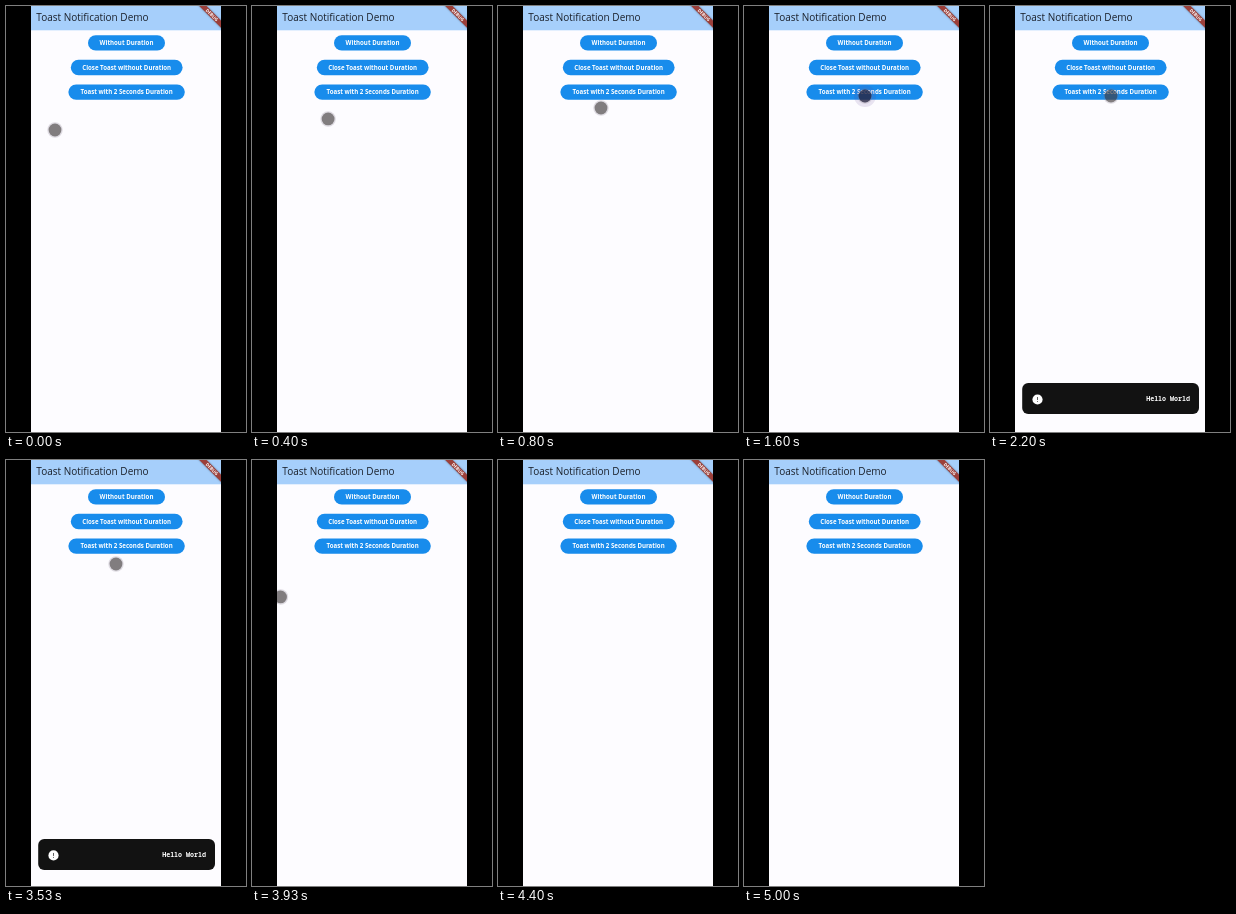
An HTML page with a canvas for the animation above (5.07 s loop, 240 by 426 pixels).

```html
<!DOCTYPE html>
<html lang="en">
<head>
<meta charset="utf-8">
<title>Toast Notification Demo</title>
<style>
  html, body { margin: 0; width: 100%; height: 100%; overflow: hidden; background: #000; }
  canvas { display: block; width: 240px; height: 426px; }
</style>
</head>
<body>
<canvas id="stage"></canvas>
<script>
const W = 240, H = 426, LOOP = 5070;
const PAGE = { x: 25, w: 190 };
const SANS = '"Open Sans", "Noto Sans", sans-serif';
const MONO = '"Noto Sans Mono", "DejaVu Sans Mono", monospace';
const BUTTONS = [
  { label: 'Without Duration', x: 82, y: 29.2, w: 77 },
  { label: 'Close Toast without Duration', x: 64.8, y: 53.8, w: 111.8 },
  { label: 'Toast with 2 Seconds Duration', x: 62.4, y: 78.4, w: 116.4 }
];
// pointer path: time, x, y
const PATH = [
  [0, 49, 124], [800, 103, 102], [1330, 121, 90],
  [3170, 121, 90], [3530, 110, 104], [4050, 16, 142]
];

const canvas = document.getElementById('stage');
const ratio = window.devicePixelRatio || 1;
canvas.width = W * ratio;
canvas.height = H * ratio;
const ctx = canvas.getContext('2d');

const clamp = v => Math.max(0, Math.min(1, v));
const span = (t, from, to) => clamp((t - from) / (to - from));
const smooth = p => p * p * (3 - 2 * p);

function pill(x, y, w, h, r, color) {
  ctx.fillStyle = color;
  ctx.beginPath();
  ctx.roundRect(x, y, w, h, r);
  ctx.fill();
}

function disc(x, y, r, color) {
  ctx.fillStyle = color;
  ctx.beginPath();
  ctx.arc(x, y, r, 0, Math.PI * 2);
  ctx.fill();
}

function text(str, x, y, font, color, align = 'left') {
  ctx.font = font;
  ctx.fillStyle = color;
  ctx.textAlign = align;
  ctx.fillText(str, x, y);
}

function drawPage() {
  ctx.fillStyle = '#fdfcff';
  ctx.fillRect(PAGE.x, 0, PAGE.w, H);
  ctx.fillStyle = '#a6cffb';
  ctx.fillRect(PAGE.x, 0, PAGE.w, 24.3);
  text('Toast Notification Demo', 30.3, 15.2, '10px ' + SANS, '#1c222c');
  for (const b of BUTTONS) {
    pill(b.x, b.y, b.w, 15.4, 7.7, '#188cec');
    text(b.label, b.x + b.w / 2, b.y + 9.9, 'bold 6.13px ' + SANS, '#fff', 'center');
  }
}

function drawBanner() {
  ctx.save();
  ctx.translate(PAGE.x + PAGE.w, 0);
  ctx.rotate(Math.PI / 4);
  ctx.shadowColor = 'rgba(0,0,0,.45)';
  ctx.shadowBlur = 2 * ratio;
  ctx.fillStyle = '#9c3f3a';
  ctx.fillRect(-22, 10.2, 44, 5.2);
  ctx.shadowColor = 'transparent';
  text('DEBUG', 0, 14.4, 'bold 4.5px ' + SANS, '#fff', 'center');
  ctx.restore();
}

function drawToast(t) {
  if (t < 1640 || t > 3910) return;
  const enter = 1 - Math.pow(1 - span(t, 1640, 2200), 3);
  const leave = Math.pow(span(t, 3450, 3900), 2);
  const y = 377 + 53 * (1 - enter) + 60 * leave;
  pill(32.2, y, 176.8, 31, 6, '#121212');
  disc(47.5, y + 16.5, 5.1, '#fff');
  ctx.fillStyle = '#3a3a3a';
  ctx.fillRect(47.1, y + 14, 0.8, 3);
  ctx.fillRect(47.1, y + 18, 0.8, 0.9);
  text('Hello World', 200, y + 18.1, 'bold 6.65px ' + MONO, '#fff', 'right');
}

function pointerAt(t) {
  const i = Math.max(1, PATH.findIndex(k => k[0] > t));
  const a = PATH[i - 1], b = PATH[i];
  const p = smooth(span(t, a[0], b[0]));
  return [a[1] + (b[1] - a[1]) * p, a[2] + (b[2] - a[2]) * p];
}

function drawPointer(t) {
  if (t >= 4050) return;
  const [x, y] = pointerAt(t);
  const press = span(t, 1460, 1560) * (1 - span(t, 1620, 1800));
  if (press > 0) disc(x, y, 7 + 4 * press, `rgba(95,65,145,${0.13 * press})`);
  disc(x, y, 7.7, 'rgba(130,120,140,.25)');
  disc(x, y, 6.4, 'rgba(52,48,46,.55)');
  if (press > 0) disc(x, y, 6.4, `rgba(12,18,70,${0.4 * press})`);
}

function draw(t) {
  ctx.setTransform(ratio, 0, 0, ratio, 0, 0);
  ctx.fillStyle = '#000';
  ctx.fillRect(0, 0, W, H);
  ctx.save();
  ctx.beginPath();
  ctx.rect(PAGE.x, 0, PAGE.w, H);
  ctx.clip();
  drawPage();
  drawToast(t);
  drawBanner();
  drawPointer(t);
  ctx.restore();
}

const start = performance.now();
function tick() {
  draw((performance.now() - start) % LOOP);
  requestAnimationFrame(tick);
}
tick();
</script>
</body>
</html>
```
